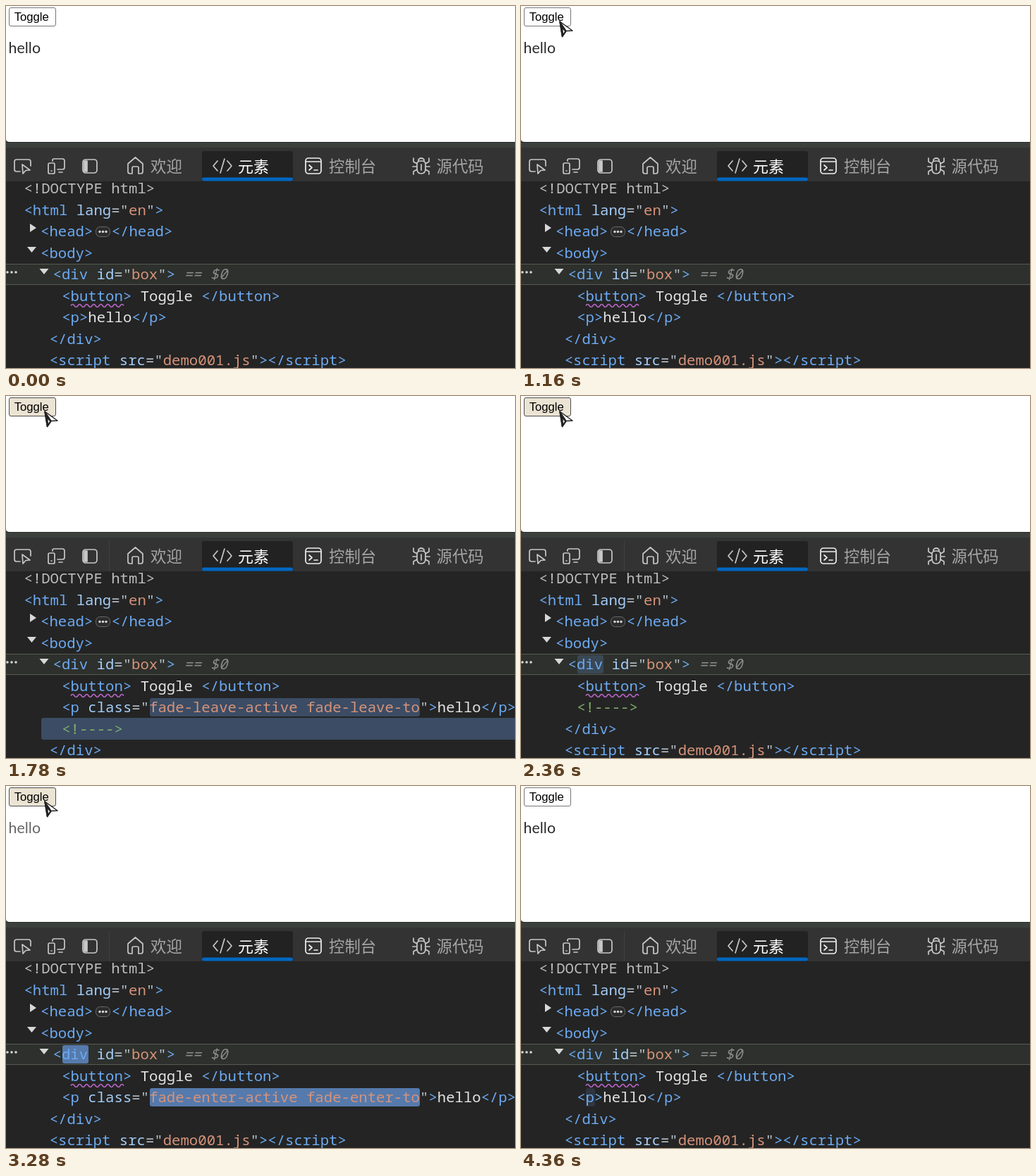
An HTML page that plays this animation: 722 by 514 pixels, repeating every 4.5 s.

```html
<!DOCTYPE html>
<html lang="en">
<head>
<meta charset="utf-8">
<title>Fade toggle</title>
<style>
  html, body { margin: 0; width: 100%; height: 100%; overflow: hidden; background: #242424; }
  svg { display: block; width: 722px; height: 514px; }
  text { white-space: pre; }
  .code text { font: 20.65px "Noto Sans Mono", monospace; fill: #e4e4e4; }
  .code .tag { fill: #6caaf2; }
  .code .attr { fill: #a4cdf8; }
  .code .punct { fill: #b9c3cd; }
  .code .value { fill: #d6937a; }
  .code .comment { fill: #7fae6c; }
  .code .doctype { fill: #bdbdbd; }
  .code .hint { fill: #8b8b8b; font-style: italic; }
  .flash { fill: #567aac; opacity: 0; }
  .tabs text { font: 22.4px "Noto Sans CJK SC", "Noto Sans CJK", sans-serif; fill: #a6a6a6; }
  .tabs .current { font-size: 22px; font-weight: 500; fill: #fff; }
  .icon { fill: none; stroke: #c8c8c8; stroke-width: 1.7; stroke-linejoin: round; stroke-linecap: round; }
  .solid { fill: #d8d8d8; }
  #button rect { fill: #fff; stroke: #767676; }
  #button.hover rect { fill: #ebe3d3; stroke: #4c4c4c; }
  #button text { font: 16.7px "Liberation Sans", Arial, sans-serif; }
  #hello { font: 21.4px Lato, sans-serif; fill: #2b2b2b; }
</style>
</head>
<body>
<svg viewBox="0 0 722 514">
  <rect width="722" height="514" fill="#242424"/>
  <rect y="186" width="722" height="8" fill="#292b29"/>
  <rect y="194" width="722" height="8" fill="#3b403c"/>
  <rect y="201" width="722" height="48" fill="#333"/>
  <path d="M0 0H722V193H5Q0 193 0 189Z" fill="#fff"/>

  <g id="button">
    <rect x="4.5" y="2.5" width="66" height="26" rx="2.5"/>
    <text x="11.7" y="21">Toggle</text>
  </g>
  <text id="hello" x="3.6" y="67">hello</text>

  <g class="tabs">
    <path id="divider" d="M146.5 206V249" stroke="#3f3f3f"/>
    <path d="M278 249V209Q278 206 281 206H404Q407 206 407 209V249Z" fill="#222"/>
    <rect x="278" y="243.500" width="129" height="5" rx="2.5" fill="#0067c0"/>
    <g class="icon">
      <path d="M20 235H15Q12 235 12 232V221Q12 218 15 218H32Q35 218 35 221V227"/>
      <path d="M23 225L34 233L28 233.500L24 238Z"/>
      <path d="M66 220V219Q66 217 68 217H80Q83 217 83 220V229Q83 232 80 232H73M75 236H80"/>
      <rect x="60" y="223" width="9" height="15" rx="2"/>
      <path d="M64 234H65"/>
      <rect x="109" y="218" width="20" height="19" rx="4"/>
      <path d="M111 220H115V235H111Z" fill="#c8c8c8"/>
      <path d="M173 224L183.500 215L194 224V235Q194 238 191 238H188V230Q188 228 186 228H181Q179 228 179 230V238H176Q173 238 173 235Z"/>
      <path d="M300 220L294 227L300 234M314 220L320 227L314 234M310 217L304 237"/>
      <g stroke="#f0f0f0">
        <rect x="425" y="216" width="22" height="22" rx="4"/>
        <path d="M426 221H446M430 226L434 229.500L430 233M437 233H442"/>
      </g>
      <path d="M583 224Q583 220 589 220T595 224V231Q595 238 589 238T583 231ZM585 220V218Q589 214 593 218V220M589 225V233M583 228H577M595 228H601M583 224L578 221V216M595 224L600 221V216M583 232L578 235V239M595 232L600 235V239"/>
    </g>
    <text x="205" y="236">欢迎</text>
    <text x="329" y="236" class="current">元素</text>
    <text x="458" y="236">控制台</text>
    <text x="610.500" y="236">源代码</text>
  </g>

  <rect x="-1" y="366.500" width="724" height="29" fill="#2d302c" stroke="#565b52"/>
  <g class="solid">
    <path d="M34 309L43 315L34 321ZM30 342H43L36.500 350ZM47.500 373H60.500L54 381Z"/>
    <circle cx="2" cy="378" r="1.800"/><circle cx="8" cy="378" r="1.800"/><circle cx="14" cy="378" r="1.800"/>
    <rect x="127.500" y="313.500" width="20" height="14" rx="6" fill="#2c2c2c" stroke="#686868"/>
    <circle cx="133" cy="320.500" r="1.700"/><circle cx="137.500" cy="320.500" r="1.700"/><circle cx="142" cy="320.500" r="1.700"/>
  </g>

  <rect class="flash" id="divFlash" x="80" y="368" width="37" height="26" rx="3"/>
  <rect class="flash" id="classFlash" x="204" y="429" width="383" height="26" rx="3"/>
  <rect class="flash" id="commentFlash" x="50" y="457" width="676" height="31" rx="3"/>
  <rect class="flash" id="tagFlash" x="92" y="429" width="13" height="26" rx="3"/>
  <g class="code" id="code"></g>
  <path id="squiggle" fill="none" stroke="#b565c4" stroke-width="1.600"/>

  <g id="cursor" stroke="#222" stroke-width="1.500" stroke-linejoin="round">
    <path d="M0 0L18 13L9 13.500L3.500 21.500Z" fill="#fff"/>
    <path d="M0 0L9 13.500L3.500 21.500Z" fill="#222"/>
    <path d="M4.500 11L7 14L5 17Z" fill="#fff" stroke="none"/>
  </g>
</svg>
<script>
const $ = id => document.getElementById(id);
const LOOP = 4500, FIRST = 90, STEP = 152.5, ROW = 30.55;

const span = (kind, s) =>
  `<tspan class="${kind}">${s.replace(/</g, '&lt;').replace(/>/g, '&gt;')}</tspan>`;
const tag = s => span('tag', s);
const attr = (name, value) =>
  span('attr', ' ' + name) + span('punct', '="') + span('value', value) + span('punct', '"');
const line = (row, x, body, id = '') =>
  `<text id="${id}" x="${x}" y="${266 + row * ROW}">${body}</text>`;
const paragraph = (id, classes) =>
  line(6, 79.2, tag('<p') + (classes ? attr('class', classes) : '') + tag('>') + 'hello' + tag('</p>'), id);

$('code').innerHTML = [
  line(0, 25.4, span('doctype', '<!DOCTYPE html>')),
  line(1, 25.4, tag('<html') + attr('lang', 'en') + tag('>')),
  line(2, 49, tag('<head>')),
  line(2, 149.7, tag('</head>')),
  line(3, 49, tag('<body>')),
  line(4, 66.6, tag('<div') + attr('id', 'box') + tag('>') + span('hint', ' == $0')),
  line(5, 79.2, tag('<button>') + ' Toggle ' + tag('</button>')),
  paragraph('plain', ''),
  paragraph('leaving', 'fade-leave-active fade-leave-to'),
  paragraph('entering', 'fade-enter-active fade-enter-to'),
  line(6, 79.2, span('comment', '<!---->'), 'comment'),
  '<g id="tail">',
  line(7, 61.7, tag('</div>')),
  line(8, 61.7, tag('<script') + attr('src', 'demo001.js') + tag('></' + 'script>')),
  '</g>'
].join('');
$('squiggle').setAttribute('d', 'M92 425.5q2.5 -4 5 0' + 't5 0'.repeat(14));

// CSS-style cubic-bezier easing
function bezier(x1, y1, x2, y2) {
  const at = (a, b, s) => 3 * a * s * (1 - s) ** 2 + 3 * b * s * s * (1 - s) + s ** 3;
  return x => {
    if (x <= 0 || x >= 1) return x <= 0 ? 0 : 1;
    let lo = 0, hi = 1;
    for (let i = 0; i < 20; i++) {
      const mid = (lo + hi) / 2;
      if (at(x1, x2, mid) < x) lo = mid; else hi = mid;
    }
    return at(y1, y2, lo);
  };
}
const ease = bezier(.25, .1, .25, 1);
const settle = bezier(0, 0, .2, 1);

const timeOf = step => FIRST + step * STEP;
const show = (id, on) => $(id).style.display = on ? '' : 'none';
const LEAVE = 9, GONE = 12, ENTER = 21, DONE = 24;

function draw(ms) {
  const step = Math.floor((ms % LOOP - FIRST + 20) / STEP);
  const now = timeOf(step);
  const within = (from, to) => step >= from && step < to;
  const flash = (id, from, to = 99) =>
    $(id).style.opacity = within(from, to) ? 1 - settle((now - timeOf(from)) / 1400) : 0;

  const leaving = within(LEAVE, GONE), entering = within(ENTER, DONE);
  show('plain', step < LEAVE || step >= DONE);
  show('leaving', leaving);
  show('entering', entering);
  show('comment', within(LEAVE, ENTER));
  $('comment').setAttribute('transform', `translate(0 ${leaving ? ROW : 0})`);
  $('tail').setAttribute('transform', `translate(0 ${leaving ? ROW : 0})`);

  flash('divFlash', step < ENTER ? GONE : ENTER, step < ENTER ? ENTER : DONE + 3);
  flash('classFlash', leaving ? LEAVE : ENTER, leaving ? GONE : DONE);
  flash('commentFlash', LEAVE, GONE);
  flash('tagFlash', DONE);

  $('hello').style.opacity = 1 - ease((now - 1262) / 500) + ease((now - 3080) / 500);
  $('button').classList.toggle('hover', within(8, 27));
  show('divider', step >= 8);

  show('cursor', within(6, 28));
  const away = step === 6 || step === 27;
  $('cursor').setAttribute('transform', away ? 'translate(98 58)' : 'translate(55 22)');
}

const start = performance.now();
function tick() {
  draw(performance.now() - start);
  requestAnimationFrame(tick);
}
tick();
</script>
</body>
</html>
```
